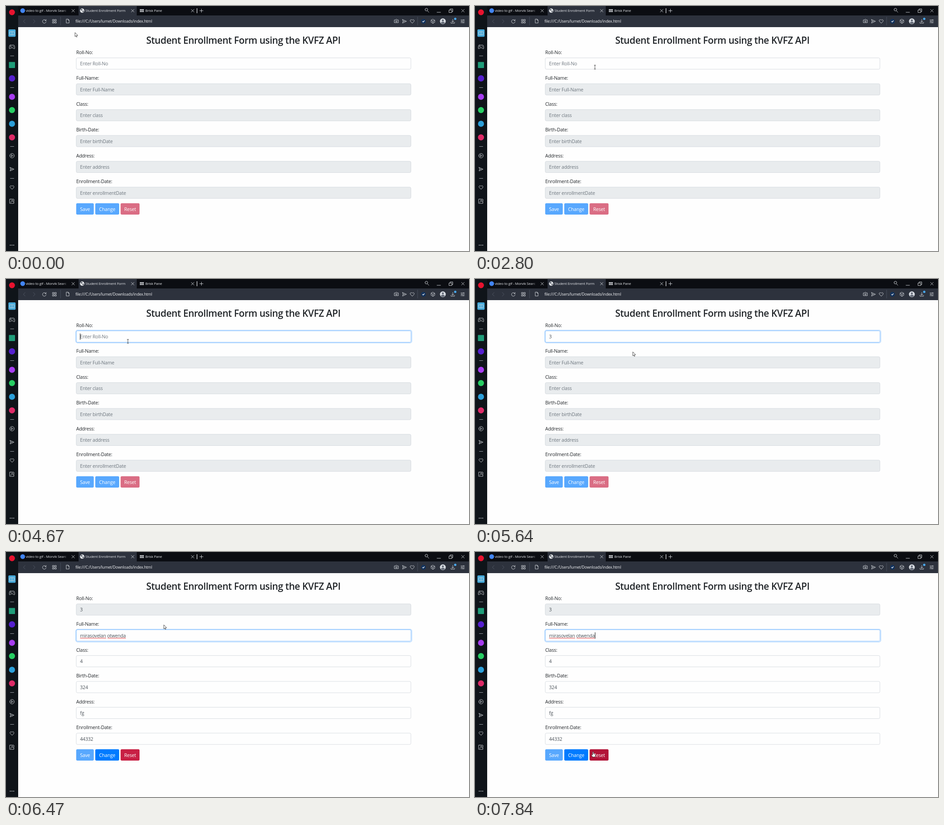
An HTML page that plays this animation: 1027 px wide and 545 px high, repeating every 8 s.

```html
<!DOCTYPE html>
<html lang="en">
<head>
<meta charset="utf-8">
<title>Student Enrollment Form</title>
<style>
html, body { margin: 0; width: 100%; height: 100%; overflow: hidden; background: #fefefe; }
svg { display: block; width: 1027px; height: 545px; font: 10.5px "Open Sans", "Noto Sans", sans-serif; letter-spacing: -.2px; }
text { white-space: pre; }
.title { font-size: 21px; font-weight: 600; letter-spacing: -.42px; fill: #212529; }
.label { fill: #212529; }
.tab { font-size: 7.9px; letter-spacing: -.17px; fill: #e4e6ea; }
.url { font-size: 8.6px; letter-spacing: -.18px; fill: #f2f3f5; }
.icon { fill: none; stroke: #d5d8dd; stroke-width: .9; stroke-linecap: round; stroke-linejoin: round; }
.dim { stroke: #555b68; }
.btn { fill: #fff; text-anchor: middle; }
.cursor { fill: #fff; stroke: #222; stroke-width: .8; stroke-linejoin: round; }
</style>
</head>
<body>
<svg id="stage" viewBox="0 0 1027 545" xmlns="http://www.w3.org/2000/svg"></svg>
<script>
const LOOP = 8000, FRAME = 100 / 3;
const FOCUS = 3370, TYPED = 4670, FILLED = 5690, ON_CHANGE = 6960, ON_RESET = 7700;

const fields = [
  ['Roll-No:', 'Enter Roll-No', '3'],
  ['Full-Name:', 'Enter Full-Name', 'mirasovelan otwenda'],
  ['Class:', 'Enter class', '4'],
  ['Birth-Date:', 'Enter birthDate', '324'],
  ['Address:', 'Enter address', 'fg'],
  ['Enrollment-Date:', 'Enter enrollmentDate', '44332']
];
const buttons = [
  ['Save', 155.7, 39, [0, 123, 255], [0, 105, 217]],
  ['Change', 198, 53, [0, 123, 255], [0, 105, 217]],
  ['Reset', 254.2, 42, [200, 32, 68], [178, 20, 56]]
];
// Pointer path: time, x, y
const path = [
  [0, 153, 59], [500, 265, 136], [1730, 265, 136], [1800, 266, 136], [2800, 266, 136],
  [2970, 267, 136], [3330, 267, 136], [3600, 267, 137], [3800, 267, 137], [3970, 268, 138],
  [4630, 268, 138], [4970, 342, 158], [5400, 342, 158], [5600, 350, 162], [6870, 350, 162],
  [7000, 249, 438], [7070, 248, 441], [7240, 236, 449], [7500, 236, 449], [7840, 262, 444], [8000, 262, 444]
];

const top0 = 115.4, pitch = 57.5;
const fieldTop = i => top0 + pitch * i;
const rect = (x, y, w, h, fill, extra = '') => `<rect x="${x}" y="${y}" width="${w}" height="${h}" fill="${fill}" ${extra}/>`;
const dot = (x, y, r, fill) => `<circle cx="${x}" cy="${y}" r="${r}" fill="${fill}"/>`;
const text = (x, y, s, cls, extra = '') => `<text x="${x}" y="${y}" class="${cls}" ${extra}>${s}</text>`;
const icon = (x, y, d, cls = '') => `<path class="icon ${cls}" transform="translate(${x} ${y})" d="${d}"/>`;

const glyph = {
  close: 'M-3-3 3 3M3-3-3 3',
  plus: 'M-3.7 0H3.7M0-3.7V3.7',
  search: 'M-4-1.5a3 3 0 1 0 6 0a3 3 0 1 0-6 0M1 1 4.5 4.5',
  minimise: 'M-4 0H4',
  restore: 'M-4-1.5H2V4H-4ZM-2-1.5V-4H4V2H2',
  left: 'M2-4-2 0 2 4',
  right: 'M-2-4 2 0-2 4',
  reload: 'M3.3-2A4 4 0 1 0 4 .8M4-4V-1.5H1.3',
  tiles: 'M-4-4H-1V-1H-4ZM1-4H4V-1H1ZM-4 1H-1V4H-4ZM1 1H4V4H1Z',
  page: 'M-3-4.3H.8L3-2V4.3H-3ZM.8-4.3V-2H3',
  camera: 'M-4.3-2.5H-2L-1-3.8H1L2-2.5H4.3V3.5H-4.3ZM-1.6.5a1.6 1.6 0 1 0 3.2 0a1.6 1.6 0 1 0-3.2 0',
  send: 'M-4-4 4.8 0-4 4-2.6 0ZM-2.6 0H1',
  heart: 'M0 4 -4 .2C-5.8-2.5-2-5.5 0-2.4C2-5.5 5.8-2.5 4 .2Z',
  cube: 'M0-4.5 4-2.3V2.3L0 4.5-4 2.3V-2.3ZM-4-2.3 0 0 4-2.3M0 0V4.5',
  download: 'M0-4V2M-2.3-.2 0 2 2.3-.2M-4 2.2V4.2H4V2.2',
  sliders: 'M-4-3H4M-4 0H4M-4 3H4M2-3.8V-2.2M-2-.8V.8M1 2.2V3.8',
  book: 'M0-3.4H-5V3.4H5V-3.4H0V3.4',
  pad: 'M-4-4H4Q5.5-4 5.7-1L6 3Q5.5 5.2 3.5 3.5L2.4 2H-2.4L-3.5 3.5Q-5.5 5.2-6 3L-5.7-1Q-5.5-4-4-4ZM-3.5-1H-1.5M-2.5-2V0M2-1H3.4',
  play: 'M-5 0a5 5 0 1 0 10 0a5 5 0 1 0-10 0M-1.5-2.3 2.4 0-1.5 2.3Z',
  pin: 'M1-4.5H-4.8V5H4.5V0M-2.5 2.7 0 0M-.8-2 2.8 1.6M0-1.2 3-5 5.5-2.3 2-.1'
};

function chrome() {
  const icons = [
    ['close', 149, 10.5], ['close', 281, 10.5], ['close', 414, 10.5], ['plus', 433.5, 10.5],
    ['search', 933.5, 9.5], ['minimise', 960, 14], ['restore', 987, 10.5], ['close', 1013.5, 10.5],
    ['left', 40.5, 34, 'dim'], ['right', 62.5, 34, 'dim'], ['reload', 85, 34], ['tiles', 107.5, 34],
    ['page', 137, 33.5], ['camera', 866, 33.5], ['send', 883.5, 34], ['heart', 901, 34],
    ['cube', 947, 34], ['download', 991, 34], ['sliders', 1013, 34],
    ['pad', 13.3, 91], ['play', 13.3, 333], ['send', 13, 363], ['heart', 13.3, 403.5], ['pin', 13, 434]
  ];
  return rect(0, 0, 1027, 21, '#0b0d12') + rect(0, 0, 27, 545, '#0f1419') +
    rect(27, 21, 1000, 26, '#2d323d') + rect(161, 0, 129, 22, '#2d323d') +
    dot(13.3, 14, 6.5, '#e8132f') + dot(37, 10.3, 5.2, '#4285f4') +
    text(44, 13.2, 'video to gif - Morvik Searc', 'tab') + rect(124, 3, 18, 15, 'url(#fade)') +
    dot(169, 10.3, 4.8, '#eceef0') +
    '<path d="M165.5 8Q168 6 170 8L168.5 10 166.5 10ZM169.5 11 172.5 10 172 13 170 14Z" fill="#4a505b"/>' +
    text(176, 13.2, 'Student Enrollment Form', 'tab') +
    [0, 1, 2].map(i => rect(297 + 3.1 * i, 7, 2.4, 2.8, '#d9dce0') + rect(297 + 3.1 * i, 10.6, 2.4, 2.8, '#d9dce0')).join('') +
    text(309, 13.2, 'Brisk Pane', 'tab') + rect(423, 5, 1.2, 11, '#e8eaed') +
    rect(120.5, 24, 1, 19, '#4b515e') + rect(912.5, 24, 1, 19, '#4b515e') +
    text(154, 37, 'file:///C:/Users/lumet/Downloads/index.html', 'url') +
    dot(926, 34, 5.2, '#12335e') + '<path d="M923.8 34 925.4 35.7 928.4 32.3" fill="none" stroke="#fff" stroke-width="1.2"/>' +
    dot(969, 34, 6.5, '#d9dde3') + dot(969, 32, 2.3, '#646b78') + '<path d="M964.8 38.3Q965 35 969 35T973.2 38.3Q969 41.5 964.8 38.3Z" fill="#646b78"/>' +
    rect(5.3, 52, 16, 16.5, '#45aadb', 'rx="2"') + icon(13.3, 60.5, glyph.book) +
    rect(6.5, 124.5, 13.5, 13.5, '#1f9d79', 'rx="1"') +
    dot(13.3, 161, 7, '#5620cf') + dot(13.3, 202, 6.7, '#a63cf0') + dot(13.3, 231.5, 6.7, '#27ce63') +
    dot(13.3, 262, 6.7, '#2b9fd9') + dot(13.3, 292.3, 6.7, '#dd2a67') +
    [111, 181.5, 312.5, 383.5].map(y => rect(9.3, y - .5, 8.5, 1, '#9ba0a8')).join('') +
    [9.5, 13.3, 17.1].map(x => dot(x, 532, 1, '#d5d8dd')).join('') +
    icons.map(([name, x, y, cls]) => icon(x, y, glyph[name], cls)).join('') +
    dot(996.5, 28.5, 2.6, '#49a8ee');
}

function form() {
  return text(526.5, 84.3, 'Student Enrollment Form using the KVFZ API', 'title', 'text-anchor="middle"') +
    fields.map(([label], i) => {
      const y = fieldTop(i);
      return text(155.7, y - 8.9, label, 'label') +
        rect(155.9, y, 742.2, 25.2, '#fff', `rx="2.7" id="box${i}" stroke-width=".8"`) +
        text(164.3, y + 17, '', '', `id="value${i}"`);
    }).join('') +
    buttons.map(([label, x, w], i) => `<g id="button${i}">` +
      rect(x, 438.8, w, 25.2, '', 'rx="2.7"') + text(x + w / 2, 455.8, label, 'btn') + '</g>').join('') +
    '<path id="spelling" d="M164.3 191.7H222.2M225.3 191.7H265.8" stroke="#e23b3b" stroke-width="1"/>' +
    rect(0, 0, 1, 14, '#111', 'id="caret"') +
    '<path id="cursor" class="cursor"/>';
}

const stage = document.getElementById('stage');
stage.innerHTML = `<defs><linearGradient id="fade"><stop stop-color="#0b0d12" stop-opacity="0"/><stop offset="1" stop-color="#0b0d12"/></linearGradient></defs>` + chrome() + form();
const $ = id => document.getElementById(id);
const set = (el, attrs) => { for (const k in attrs) el.setAttribute(k, attrs[k]); };

const clamp = u => Math.max(0, Math.min(1, u));
const fade = (t, start) => 1 - (1 - clamp((t - start) / 150)) ** 2.2;
const mix = (a, b, u) => `rgb(${a.map((v, i) => Math.round(v + (b[i] - v) * u))})`;

function pointer(t) {
  const i = Math.max(1, path.findIndex(p => p[0] > t));
  const [t0, x0, y0] = path[i - 1], [t1, x1, y1] = path[i];
  const u = clamp((t - t0) / (t1 - t0)), e = u * u * (3 - 2 * u);
  return [x0 + (x1 - x0) * e, y0 + (y1 - y0) * e];
}

const shapes = {
  arrow: 'M0 0V9L2 7.2 3.4 10.2 4.7 9.6 3.4 6.6 6.2 6.4Z',
  beam: 'M-2-4.3H2M0-4.3V4.3M-2 4.3H2',
  hand: 'M-1 1Q0-.7 1 1V5L4.4 5.8Q5.6 6.2 5.2 8L4.2 12H-1L-3.6 8Q-3.2 6.4-1 7.4Z'
};

function draw(t) {
  const filled = t >= FILLED;
  const enabled = i => filled ? i > 0 : i === 0;

  fields.forEach(([, hint, value], i) => {
    const ring = i === 0 ? fade(t, FOCUS) - fade(t, FILLED) : i === 1 ? fade(t, FILLED) : 0;
    const hasValue = filled || (i === 0 && t >= TYPED);
    const box = $('box' + i), label = $('value' + i);
    set(box, { fill: enabled(i) ? '#fefefe' : '#e9ecee', stroke: mix([206, 212, 218], [128, 189, 255], ring) });
    box.style.filter = 'none';
    box.style.outline = ring > 0 ? `${2 * ring}px solid rgba(0,123,255,${.25 * ring})` : 'none';
    box.style.outlineOffset = '.4px';
    box.style.borderRadius = '3px';
    label.textContent = hasValue ? value : hint;
    set(label, { fill: hasValue ? '#495057' : '#6c757d' });
  });

  const hover = [0, fade(t, ON_CHANGE) - fade(t, ON_RESET), fade(t, ON_RESET)];
  buttons.forEach(([, , , base, dark], i) => {
    const group = $('button' + i);
    set(group, { opacity: filled && i > 0 ? 1 : .65 });
    set(group.firstChild, { fill: mix(base, dark, hover[i]) });
  });

  $('spelling').style.display = filled ? '' : 'none';

  // The caret restarts its blink at every focus change or key press
  const since = filled ? FILLED - 25 : t >= TYPED ? TYPED : FOCUS;
  const lit = t >= FOCUS && Math.floor((t - since) / 500) % 2 === 0;
  set($('caret'), {
    x: filled ? 265.9 : t >= TYPED ? 170.2 : 164,
    y: fieldTop(filled ? 1 : 0) + 5.8,
    visibility: lit ? 'visible' : 'hidden'
  });

  const [x, y] = pointer(t);
  const row = Math.floor((y - top0) / pitch);
  const overField = x > 156 && x < 898 && row >= 0 && row < 6 && y - fieldTop(row) < 25.5 && enabled(row);
  const overButton = filled && y > 438.8 && y < 464 && buttons.some(([, bx, w], i) => i && x > bx && x < bx + w);
  set($('cursor'), {
    d: shapes[overButton ? 'hand' : overField ? 'beam' : 'arrow'],
    transform: `translate(${x} ${y})`
  });
}

function tick() {
  const t = performance.now() % LOOP;
  draw(Math.floor((t + 4) / FRAME) * FRAME);
  requestAnimationFrame(tick);
}
tick();
</script>
</body>
</html>
```
